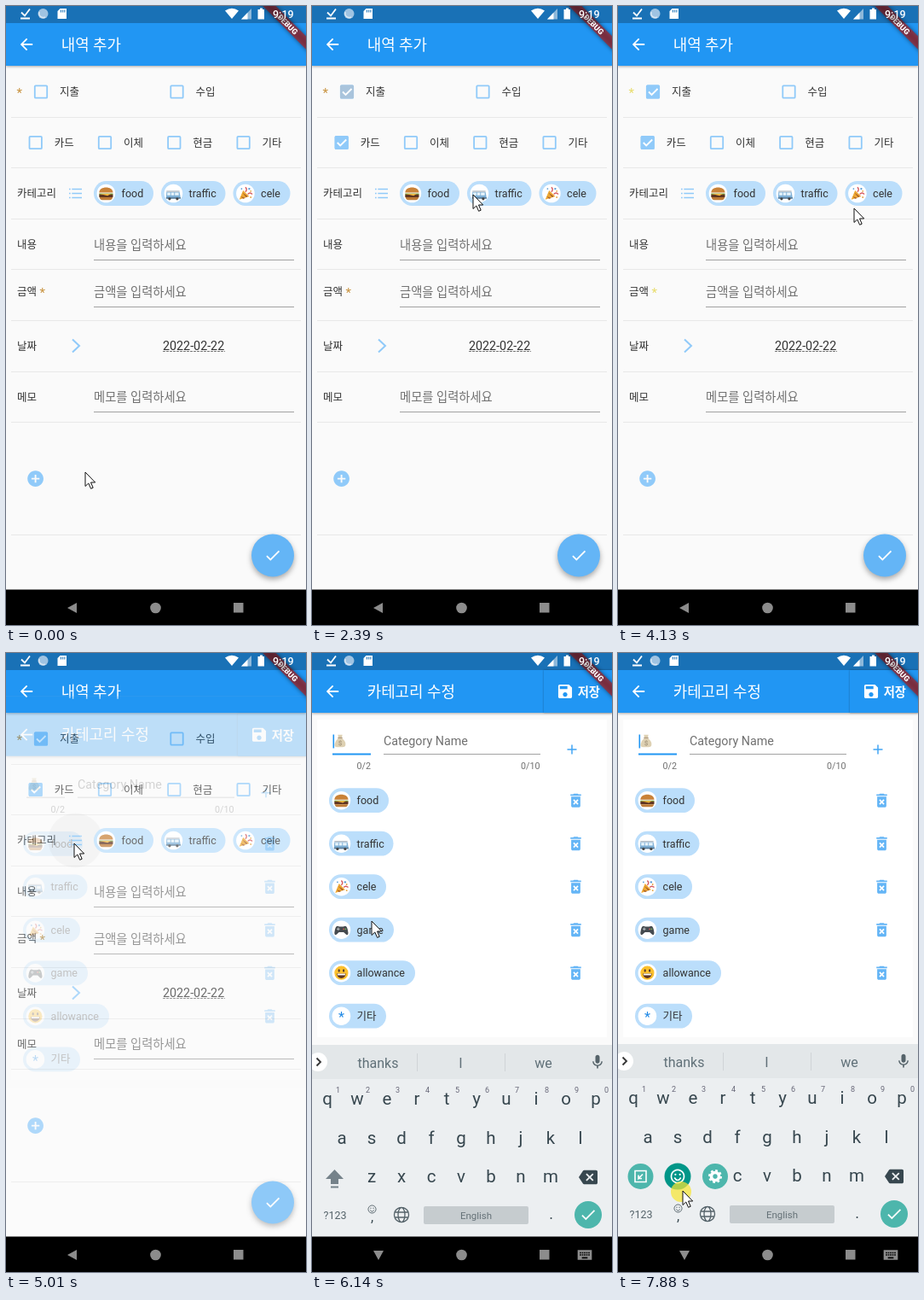
Recreate the animation shown at these times as an HTML page. Size 352 by 725 pixels, loop 8000 ms.

```html
<!DOCTYPE html>
<html lang="ko">
<head>
<meta charset="utf-8">
<style>
html, body { margin: 0; width: 100%; height: 100%; overflow: hidden; background: #fafafa; }
svg { display: block; width: 100%; height: 100%; }
text { font-family: Roboto, "Noto Sans CJK KR", "Noto Sans CJK", sans-serif; white-space: pre; }
.bar { filter: drop-shadow(0 1px 1.5px #0005); }
.fab { filter: drop-shadow(0 3px 3px #0005); }
.save { filter: drop-shadow(0 0 1px #0005); }
.blur { filter: blur(2.7px); }
</style>
</head>
<body>
<svg id="stage" viewBox="0 0 352 725"></svg>
<script>
const BLUE = '#2196f3', LIGHT = '#90caf9', MID = '#42a5f5', CHIP = '#bbdefb', INK = '#333', HINT = '#707070';
const LINE = '#989898', KEYS = '#eceff1', KEY_INK = '#37474f', TEAL = '#4db6ac';

const icons = {
  back: 'M20 11H7.83l5.59-5.59L12 4l-8 8 8 8 1.41-1.41L7.83 13H20v-2z',
  check: 'M9 16.17L4.83 12l-1.42 1.41L9 19 21 7l-1.41-1.41z',
  plusCircle: 'M12 2C6.48 2 2 6.48 2 12s4.48 10 10 10 10-4.48 10-10S17.52 2 12 2zm5 11h-4v4h-2v-4H7v-2h4V7h2v4h4v2z',
  list: 'M3 5h2v2H3zM7 5h14v2H7zM3 11h2v2H3zM7 11h14v2H7zM3 17h2v2H3zM7 17h14v2H7z',
  save: 'M17 3H5c-1.11 0-2 .9-2 2v14c0 1.1.89 2 2 2h14c1.1 0 2-.9 2-2V7l-4-4zm-5 16c-1.66 0-3-1.34-3-3s1.34-3 3-3 3 1.34 3 3-1.34 3-3 3zm3-10H5V5h10v4z',
  trash: 'M6 19c0 1.1.9 2 2 2h8c1.1 0 2-.9 2-2V7H6v12zm2.46-7.12l1.41-1.41L12 12.59l2.12-2.12 1.41 1.41L13.41 14l2.12 2.12-1.41 1.41L12 15.41l-2.12 2.12-1.41-1.41L10.59 14l-2.13-2.12zM15.5 4l-1-1h-5l-1 1H5v2h14V4z',
  mic: 'M12 14c1.66 0 3-1.34 3-3V5c0-1.66-1.34-3-3-3S9 3.34 9 5v6c0 1.66 1.34 3 3 3zm5.3-3c0 3-2.54 5.1-5.3 5.1S6.7 14 6.7 11H5c0 3.41 2.72 6.23 6 6.72V21h2v-3.28c3.28-.48 6-3.3 6-6.72z',
  erase: 'M22 3H7c-.69 0-1.23.35-1.59.88L0 12l5.41 8.11c.36.53.9.89 1.59.89h15c1.1 0 2-.9 2-2V5c0-1.1-.9-2-2-2zm-3 12.59L17.59 17 14 13.41 10.41 17 9 15.59 12.59 12 9 8.41 10.41 7 14 10.59 17.59 7 19 8.41 15.41 12 19 15.59z',
  keyboard: 'M2 5h20v14H2zM5 8v2h2V8zM8 8v2h2V8zM11 8v2h2V8zM14 8v2h2V8zM17 8v2h2V8zM5 11v2h2v-2zM8 11v2h2v-2zM11 11v2h2v-2zM14 11v2h2v-2zM17 11v2h2v-2zM8 15v2h8v-2z'
};

// Small pictures, each centred on the origin.
const pics = {
  burger: `<path d="M-9-1C-9-10 9-10 9-1z" fill="#c98238"/><path d="M-9 0H9v2H-9z" fill="#7d9a3a"/>
    <path d="M-9 1.5H9V5H-9z" fill="#5f3420"/><path d="M-8 .5H6L2 3z" fill="#efb840"/><path d="M-8.5 5h17Q8 8.500 5 8.500H-5Q-8 8.500-8.500 5z" fill="#bd7a35"/>`,
  bus: `<path d="M-9-2H8l1.5 8H-9.500z" fill="#7fb0d6"/><path d="M-9-3.500H8V-2H-9z" fill="#b4bcc4"/><path d="M-8-1h4v3.500h-4zM-3-1h4v3.500h-4zM2-1h5v3.500H2z" fill="#e9f5fc"/>
    <path d="M-9.500 5h19v2h-19z" fill="#5b7f9e"/><circle cx="-5" cy="7" r="1.8" fill="#444"/><circle cx="5" cy="7" r="1.8" fill="#444"/>`,
  party: `<path d="M-8 8L-3-4 5 4z" fill="#eea832"/><path d="M-6 4L0 6-3 7zM-4-1L3 4 1 5z" fill="#a55a2a"/><path d="M0-2Q3-5 0-8M3 1Q6-2 9 1" fill="none" stroke="#d6575c" stroke-width="1.5"/>
    <g fill="#5a9bd5"><circle cx="5" cy="-6" r="1.3"/><circle cx="-5" cy="-6" r="1"/></g><g fill="#e2a13c"><circle cx="7" cy="-3" r="1"/><circle cx="7" cy="5" r="1"/></g>`,
  pad: `<path d="M-5-5Q0-3 5-5 8-5 9 4 9 8 6 6L3 3H-3L-6 6Q-9 8-9 4-8-5-5-5z" fill="#454b50"/><path d="M-6-1h4M-4-3v4" stroke="#b8bec2" stroke-width="1.2"/>
    <circle cx="3" cy="-1" r="1" fill="#d9605a"/><circle cx="5.5" cy="-1" r="1" fill="#79b65c"/>`,
  smile: `<circle r="9" fill="#fbc02d"/><ellipse cx="-3" cy="-3" rx="1.2" ry="2" fill="#4e342e"/><ellipse cx="3" cy="-3" rx="1.2" ry="2" fill="#4e342e"/>
    <path d="M-6 1H6Q5 7 0 7T-6 1z" fill="#5d3423"/><path d="M-5 1H5V3H-5z" fill="#fff"/>`,
  bag: `<path d="M-3-8H3L2-4Q8 1 7 5 7 8 3 8H-4Q-8 8-7 4-6-1-2-4z" fill="#cdb98c"/><path d="M-3-4H3" stroke="#8d6e45" stroke-width="1.5"/>
    <text y="6" font-size="9" font-weight="700" text-anchor="middle" fill="#806a42">$</text>`,
  star: `<text y="8" font-size="18" text-anchor="middle" fill="#1e88e5">*</text>`
};

const text = (s, x, y, size = 12.5, fill = INK, more = '') => `<text x="${x}" y="${y}" font-size="${size}" fill="${fill}" ${more}>${s}</text>`;
const mid = (s, x, y, size, fill) => text(s, x, y, size, fill, 'text-anchor="middle"');
const end = (s, x, y) => text(s, x, y, 10.7, HINT, 'text-anchor="end"');
const icon = (name, x, y, fill, size = 21.5) =>
  `<path d="${icons[name]}" fill="${fill}" fill-rule="evenodd" transform="translate(${x - size / 2} ${y - size / 2}) scale(${size / 24})"/>`;
const rect = (x, y, w, h, fill, more = '') => `<rect x="${x}" y="${y}" width="${w}" height="${h}" fill="${fill}" ${more}/>`;
const disc = (x, y, r, fill, more = '') => `<circle cx="${x}" cy="${y}" r="${r}" fill="${fill}" ${more}/>`;
const stroke = (d, color, width = 1, more = '') => `<path d="${d}" fill="none" stroke="${color}" stroke-width="${width}" ${more}/>`;
const pic = (name, x, y, scale = .9) => `<g transform="translate(${x} ${y}) scale(${scale})">${pics[name]}</g>`;
const group = (id, body, more = '') => `<g id="${id}" ${more}>${body}</g>`;

const chip = ([label, w, name], x, y) => rect(x, y - 14.4, w, 28.8, CHIP, 'rx="14.4"') +
  disc(x + 14.4, y, 10.8, '#fff') + pic(name, x + 14.4, y) + text(label, x + 32.6, y + 4.5);
const box = (x, y, label, id) => rect(x - 7.2, y - 7.2, 14.4, 14.4, 'none', `stroke="${LIGHT}" stroke-width="1.8" rx="1"`) +
  (id ? group(id, rect(x - 8, y - 8, 16, 16, 'currentColor', 'rx="1.5"') + stroke(`M${x - 5} ${y}l3.5 3.5 7-7`, '#fff', 1.8), `color="${LIGHT}"`) : '') +
  text(label, x + 22, y + 4.5);
const field = (hint, y) => text(hint, 103, y, 14.3, HINT) + rect(103, y + 12, 235, .9, LINE);
const header = title => `<g class="bar">${rect(0, 0, 352, 70, BLUE)}</g>` + icon('back', 24, 45, '#fff') +
  text(title, 64.7, 51.5, 17.9, '#fff', 'font-weight="500"');

const categories = [['food', 70, 'burger'], ['traffic', 75.5, 'bus'], ['cele', 67, 'party'],
  ['game', 76, 'pad'], ['allowance', 101, 'smile'], ['기타', 67, 'star']];
let chipX = 103;
const chipRow = categories.map(c => { const s = chip(c, chipX, 219.5); chipX += c[1] + 9; return s; }).join('');

const entryPage = rect(0, 0, 352, 725, '#fafafa') + header('내역 추가') +
  [130, 189, 249, 308, 368, 428, 487, 619].map(y => rect(6, y, 340, 1, '#e8e8e8')).join('') +
  group('stars', text('*', 12.5, 107, 15, 'currentColor') + text('*', 39.5, 341, 15, 'currentColor')) +
  box(41, 100.5, '지출', 'spend') + box(200.5, 100.5, '수입') +
  box(34.7, 160, '카드', 'card') + box(116, 160, '이체') + box(197.3, 160, '현금') + box(278.6, 160, '기타') +
  text('카테고리', 13, 224) + disc(81.5, 219.5, 32, '#000', 'id="ripple"') + icon('list', 81.5, 219.5, LIGHT, 20) +
  `<g clip-path="url(#row)">${group('chips', chipRow)}</g>` +
  text('내용', 13, 284) + field('내용을 입력하세요', 285) +
  text('금액', 13, 339) + field('금액을 입력하세요', 340) +
  text('날짜', 13, 403) + stroke('M78 390.5l8 7.5-8 7.5', LIGHT, 2) +
  text('2022-02-22', 184, 403, 14.3) + stroke('M184 404.5H257', '#777', 1, 'stroke-dasharray="3 1"') +
  text('메모', 13, 463) + field('메모를 입력하세요', 463) +
  icon('plusCircle', 34.6, 553.6, LIGHT, 22.5) +
  disc(313, 643.5, 25, '#64b5f6', 'class="fab"') + icon('check', 313, 643.5, '#fff');

const editPage = rect(0, 0, 352, 725, '#fafafa') + header('카테고리 수정') +
  rect(272, 20, 82, 50, BLUE, 'class="save"') + icon('save', 297, 45, '#fff') + text('저장', 311.7, 51, 14.3, '#fff', 'font-weight="700"') +
  rect(6, 78, 340, 372, '#fff') +
  `<g opacity=".65">${pic('bag', 33, 103)}</g>` + rect(24, 118, 45, .9, LINE) + end('0/2', 69, 136) +
  text('Category Name', 84, 108, 14.3, HINT) + rect(84, 118, 184, .9, LINE) + end('0/10', 267.5, 136) +
  stroke('M299.5 113h11M305 107.5v11', MID, 1.5) +
  categories.map((c, i) => chip(c, 20, 172.7 + i * 50.5) + (i < 5 ? icon('trash', 309.5, 172.7 + i * 50.5, '#64b5f6') : '')).join('') +
  group('focus', rect(24, 117.5, 45, 2, BLUE)) + rect(24.5, 95.5, 1.6, 16, BLUE, 'id="caret"');

const ring = (x, y, rx, ry = rx) => `M${x - rx} ${y}a${rx} ${ry} 0 1 1 0 .01`;
const face = (x, y, r, color, w) => stroke(`${ring(x, y, r)}M${x - r / 2} ${y + r * .2}q${r / 2} ${r * .8} ${r} 0`, color, w) +
  disc(x - r * .35, y - r * .3, r * .15, color) + disc(x + r * .35, y - r * .3, r * .15, color);
const letters = (row, x, y) => [...row].map((c, i) => mid(c, x + i * 35, y, 20.5, KEY_INK)).join('');

const keyboard = rect(0, 459, 352, 230, KEYS) + rect(0, 459, 352, 40, '#e3e7e9') +
  disc(7, 479, 11, '#fff') + stroke('M5.5 474.5l4.5 4.5-4.5 4.5', '#333', 1.8) +
  mid('thanks', 77.5, 486, 16, '#607078') + mid('I', 174.5, 486, 16, '#607078') + mid('we', 271.5, 486, 16, '#607078') +
  rect(123, 469, 1, 21, '#cfd4d7') + rect(226, 469, 1, 21, '#cfd4d7') + icon('mic', 335, 479, '#55636a', 20) +
  letters('qwertyuiop', 18, 529) + [...'1234567890'].map((c, i) => mid(c, 30.5 + i * 35, 514.5, 9, '#667')).join('') +
  letters('asdfghjkl', 35, 574.5) + letters('zxcvbnm', 70, 620) +
  '<path d="M26.5 605L37 616H31V622H22V616H16z" fill="#75828a"/>' + rect(22, 624.5, 9, 2, '#75828a') +
  icon('erase', 324, 614, KEY_INK, 22) +
  mid('?123', 27, 663, 12.5, '#55636a') + face(70.5, 651.5, 4.5, '#55636a', 1) + mid(',', 70.5, 666, 16, KEY_INK) +
  stroke(ring(105, 658, 8.5) + ring(105, 658, 4, 8.5) + 'M97.5 655h15M97.5 661h15', '#55636a', 1.3) +
  rect(131, 648, 123, 21, '#c6cccf', 'rx="2"') + mid('English', 192.5, 662.5, 11.5, '#667278') +
  mid('.', 280.5, 663, 18, KEY_INK) + disc(324, 658, 16, TEAL) + icon('check', 324, 658, '#fff') +
  group('popup', rect(9, 597, 123, 35, KEYS) + disc(26.5, 614, 15, TEAL) + disc(70, 614, 15.5, '#009688') + disc(114, 614, 15, TEAL) +
    stroke('M20 607.5h13v13h-13zM29 611.5l-5 5v-4m0 4h4', '#fff', 1.6) + face(70, 614, 7.5, '#fff', 1.7) +
    stroke(ring(114, 614, 4.5), '#fff', 3.5) +
    disc(114, 614, 6.8, 'none', 'stroke="#fff" stroke-width="2.4" stroke-dasharray="2.7 2.64"'));

const ribbon = (fill, more) => rect(-45, 25, 90, 10.8, fill, more);
const system = `<g transform="translate(352 0) rotate(45)">${ribbon('#000', 'opacity=".5" class="blur"') + ribbon('#b71c1c', 'opacity=".63"') +
    text('DEBUG', 0, 33.6, 9.1, '#fff', 'text-anchor="middle" font-weight="900"')}</g>` +
  rect(0, 0, 352, 20, '#000', 'opacity=".25"') +
  stroke('M18 7.5l4 4 6-8M17 14.5h11', '#fff', 1.8) + disc(43.5, 9, 6, '#9fc3e2') + stroke('M39 7a5 5 0 0 0 7 6', '#d7e6f3', 1.5) +
  `<path d="M63.5 3H71V15H60.5V6zM257 5.5q8-5.5 16 0L265 15zM295.5 4H298V2.5h3V4h2V15.5h-7.5z" fill="#fff"/>
   <path d="M276 15.5H288V3z" fill="#8db8da"/><path d="M276 15.5h7.5V7.7z" fill="#fff"/>` +
  stroke('M64.5 4.5v3M66.7 4.5v3M68.9 4.5v3', '#1971b6', 1) +
  text('9:19', 313, 14, 12.5, '#fff', 'font-weight="500"') +
  rect(0, 683.5, 352, 42, '#000') + '<path id="navBack" fill="#8c8c8c"/>' + disc(175.5, 705, 6.3, '#8c8c8c') + rect(267, 699, 11.5, 11.5, '#8c8c8c') +
  group('navKeys', icon('keyboard', 320, 705, '#8c8c8c', 20));

stage.innerHTML = `<clipPath id="row">${rect(103, 200, 236, 40, '#000')}</clipPath>` +
  group('entry', entryPage) + group('edit', editPage) + group('keys', keyboard) + system +
  disc(0, 0, 12, '#f6e534', 'id="press" opacity=".72"') +
  `<path id="pointer" d="M0 0V16.5L3.8 13 6.6 19.3 9.2 18.2 6.5 12H11.7z" fill="#fff" stroke="#111" stroke-linejoin="round"/>`;

const pointerPath = [[125, 93, 546], [500, 41, 157], [625, 41, 157], [875, 42, 98], [1000, 42, 98], [1750, 206, 200],
  [2125, 206, 200], [2375, 189, 221], [2500, 226, 220], [2875, 109, 213], [3750, 109, 213], [4125, 277, 237],
  [4625, 101, 228], [4750, 80, 223], [5250, 80, 223], [5500, 40, 103], [5875, 42, 105], [6125, 70, 314],
  [6750, 86, 656], [7125, 75, 658], [7625, 75, 658], [7875, 76, 630]];
const scrollPath = [[2375, 0], [3000, -170], [3750, -170], [4125, 0]];

const clamp = v => Math.min(1, Math.max(0, v));
function follow(path, t) {
  const i = path.findIndex(k => k[0] > t);
  if (i === 0) return path[0].slice(1);
  if (i < 0) return path[path.length - 1].slice(1);
  const a = path[i - 1], b = path[i], p = (t - a[0]) / (b[0] - a[0]), e = p * p * (3 - 2 * p);
  return a.slice(1).map((v, n) => v + (b[n + 1] - v) * e);
}
function bezier(x1, y1, x2, y2, x) {
  const at = (a, b, s) => 3 * a * s * (1 - s) ** 2 + 3 * b * s * s * (1 - s) + s ** 3;
  let lo = 0, hi = 1;
  for (let i = 0; i < 20; i++) { const s = (lo + hi) / 2; at(x1, x2, s) < x ? lo = s : hi = s; }
  return at(y1, y2, lo);
}

const $ = id => document.getElementById(id);
const set = (id, name, value) => $(id).setAttribute(name, value);
const show = (id, on) => set(id, 'visibility', on ? 'visible' : 'hidden');
const move = (id, x, y) => set(id, 'transform', `translate(${x} ${y})`);

function draw(t) {
  const [x, y] = follow(pointerPath, t);
  move('pointer', x, y);
  move('press', x - 2, y + 1);
  show('press', t >= 7125);
  move('chips', follow(scrollPath, t)[0], 0);

  show('card', t >= 625);
  show('spend', t >= 1000);
  set('spend', 'color', t < 2500 ? '#a9c4dc' : LIGHT);
  set('stars', 'color', t >= 2500 && t < 4870 ? '#e8dc6a' : '#c8923e');
  set('ripple', 'opacity', t >= 4750 ? .035 : 0);

  const page = clamp((t - 4862) / 300);
  show('edit', page > 0);
  set('edit', 'opacity', bezier(.42, 0, 1, 1, page));
  move('edit', 0, 181 * (1 - bezier(.4, 0, .2, 1, page)));

  const typing = t >= 5900, rise = clamp((t - 5900) / 210);
  show('focus', typing);
  show('caret', typing && (t - 5850) % 1000 < 500);
  show('keys', typing);
  move('keys', 0, 225 * (1 - rise) ** 2 - (t >= 7375 ? 1 : 0));
  show('popup', t >= 7375);
  show('navKeys', typing);
  set('navBack', 'd', typing ? 'M72 700h12l-6 11z' : 'M83 699v12l-11-6z');
}

// The picture advances eight times a second.
function tick() {
  draw(Math.floor(performance.now() % 8000 / 125) * 125);
  requestAnimationFrame(tick);
}
tick();
</script>
</body>
</html>
```
